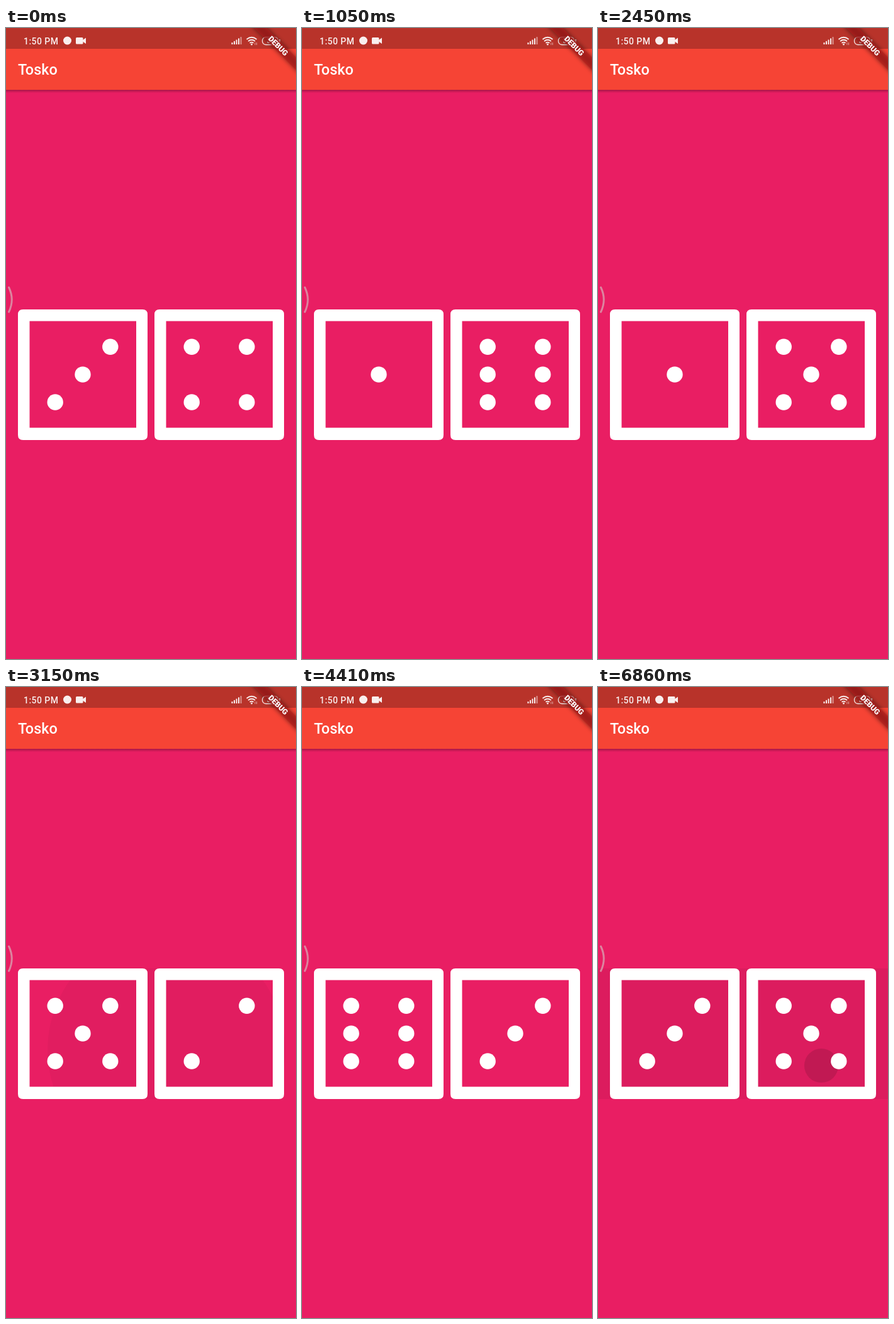
An HTML page that plays this animation: 461x1000 px, repeating every 6.93 s.

```html
<!DOCTYPE html>
<html lang="en">
<head>
<meta charset="utf-8">
<title>Dice roller</title>
<style>
  html, body { margin: 0; width: 100%; height: 100%; overflow: hidden; background: #e91e63; }
  svg { display: block; width: 461px; height: 1000px; }
  text { font-family: Roboto, "Noto Sans", sans-serif; fill: #fff; }
</style>
</head>
<body>
<svg viewBox="0 0 461 1000">
  <defs>
    <linearGradient id="shade" x2="0" y2="1">
      <stop offset="0" stop-color="#000" stop-opacity=".28"/>
      <stop offset="1" stop-color="#000" stop-opacity="0"/>
    </linearGradient>
    <filter id="soft" x="-20%" y="-100%" width="140%" height="300%"><feGaussianBlur stdDeviation="3.5"/></filter>
    <clipPath id="button"><rect y="446" width="461" height="207"/></clipPath>
  </defs>

  <rect width="461" height="1000" fill="#e91e63"/>

  <g clip-path="url(#button)">
    <rect id="highlight" y="446" width="461" height="207" opacity="0"/>
    <circle id="splash" opacity="0"/>
  </g>
  <g id="dice" fill="#fff"></g>
  <path d="M4.5 411Q14 430.500 4.500 450" fill="none" stroke="#d6bcc0" stroke-opacity=".65" stroke-width="3" stroke-linecap="round"/>

  <!-- app bar and status bar -->
  <rect y="98" width="461" height="5" fill="url(#shade)"/>
  <rect width="461" height="98" fill="#f64435"/>
  <rect width="461" height="33" fill="#b8332a"/>
  <text x="19" y="74" font-size="23.4" font-weight="500">Tosko</text>
  <g fill="#fff" opacity=".92">
    <text x="28" y="25.500" font-size="14" font-weight="500" letter-spacing=".45">1:50 PM</text>
    <circle cx="97.500" cy="20" r="6.500"/>
    <rect x="111" y="15" width="11.500" height="10.500" rx="1.500"/>
    <path d="M122 19l5-3.500v9.500l-5-3.500z"/>
  </g>
  <g id="signal" fill="#fff"></g>
  <g fill="none" stroke="#fff" stroke-width="1.700" opacity=".9">
    <path d="M382.500 18Q390.500 11.500 398.500 18M385 21Q390.500 16.500 396 21M387.500 23.800Q390.500 21.500 393.500 23.800"/>
    <path d="M396 23v4M398.500 23v4" stroke-width="1" opacity=".6"/>
    <circle cx="390.500" cy="26" r=".6"/>
    <rect x="407.500" y="14.500" width="25" height="12" rx="5.500" stroke-width="1.300"/>
    <path d="M435 18v5" stroke-width="1.500"/>
  </g>
  <text x="420.500" y="24.300" font-size="10" font-weight="700" text-anchor="middle" opacity=".9">36</text>

  <!-- corner ribbon -->
  <g transform="translate(461 0) rotate(45)">
    <rect x="-60" y="32.900" width="120" height="14.100" opacity=".5" filter="url(#soft)"/>
    <rect x="-60" y="32.900" width="120" height="14.100" fill="#b71c1c" fill-opacity=".63"/>
    <text y="44.200" font-size="12" font-weight="900" text-anchor="middle">DEBUG</text>
  </g>
</svg>
<script>
const LOOP = 6930, STEP = 70;
const BOX = { top: 446, width: 461, height: 207 };
const SCALE = 461 / 393;   // stage pixels per logical pixel
const FADE = 200;

// press time, hold length, touch point, values rolled on release
const taps = [
  [60, 78, 255, 575, 2, 5],
  [620, 210, 255, 575, 1, 6],
  [1320, 78, 260, 578, 4, 3],
  [1880, 130, 255, 575, 1, 5],
  [2930, 78, 255, 575, 5, 2],
  [3700, 78, 255, 577, 4, 5],
  [4050, 78, 255, 575, 6, 3],
  [4680, 78, 252, 570, 4, 4],
  [5100, 95, 249, 555, 3, 5],
  [6790, 140, 355, 600, 3, 4]
];

const $ = id => document.getElementById(id);

function add(parent, tag, attrs) {
  const el = document.createElementNS("http://www.w3.org/2000/svg", tag);
  return parent.appendChild(set(el, attrs));
}

function set(el, attrs) {
  for (const key in attrs) el.setAttribute(key, attrs[key]);
  return el;
}

for (let i = 0; i < 5; i++) {
  const h = 3 + i * 2.2;
  add($("signal"), "rect", { x: 358.5 + i * 3.5, y: 26 - h, width: 2, height: h, opacity: i < 4 ? .9 : .5 });
}

// Pip column, row and the values that show it
const pips = [
  [0, 0, "456"], [2, 0, "23456"], [0, 1, "6"], [1, 1, "135"],
  [2, 1, "6"], [0, 2, "23456"], [2, 2, "456"]
];

function makeDie(x) {
  const g = add($("dice"), "g", { transform: `translate(${x} 446)` });
  add(g, "path", {
    "fill-rule": "evenodd",
    d: "M8 0H198Q206 0 206 8V199Q206 207 198 207H8Q0 207 0 199V8Q0 0 8 0ZM18.500 18.500V187.500H188V18.500Z"
  });
  const dots = pips.map(([col, row]) =>
    add(g, "circle", { cx: 59.2 + col * 43.8, cy: 59.2 + row * 43.9, r: 12.7 }));
  return value => dots.forEach((dot, i) =>
    dot.setAttribute("visibility", pips[i][2].includes(value) ? "visible" : "hidden"));
}

const showLeft = makeDie(19), showRight = makeDie(236);

function drawInk(t) {
  const tap = taps.filter(([press]) => t >= press).pop();
  const [press, hold, x, y] = tap || [0, 0, 0, 0];
  const age = t - press, after = Math.max(0, age - hold);
  if (!tap || after >= FADE) {
    set($("highlight"), { opacity: 0 });
    set($("splash"), { opacity: 0 });
    return;
  }
  const held = Math.min(age, hold);
  const dx = Math.max(x, BOX.width - x);
  const dy = Math.max(y - BOX.top, BOX.top + BOX.height - y);
  const reach = Math.hypot(dx, dy);
  const radius = Math.min(reach, reach * held / 1000 + SCALE * after);
  const glow = Math.max(0, Math.min(1, held / FADE) - after / FADE);
  set($("highlight"), { opacity: .16 * glow });
  set($("splash"), { cx: x, cy: y, r: radius, opacity: .12 * (1 - after / FADE) });
}

function render(now) {
  const t = Math.floor(now % LOOP / STEP) * STEP;
  const rolled = taps.filter(([press, hold]) => t >= press + hold).pop();
  const [left, right] = rolled ? rolled.slice(4) : [3, 4];
  showLeft(left);
  showRight(right);
  drawInk(t);
}

const start = performance.now();
function tick() {
  render(performance.now() - start);
  requestAnimationFrame(tick);
}
tick();
</script>
</body>
</html>
```
